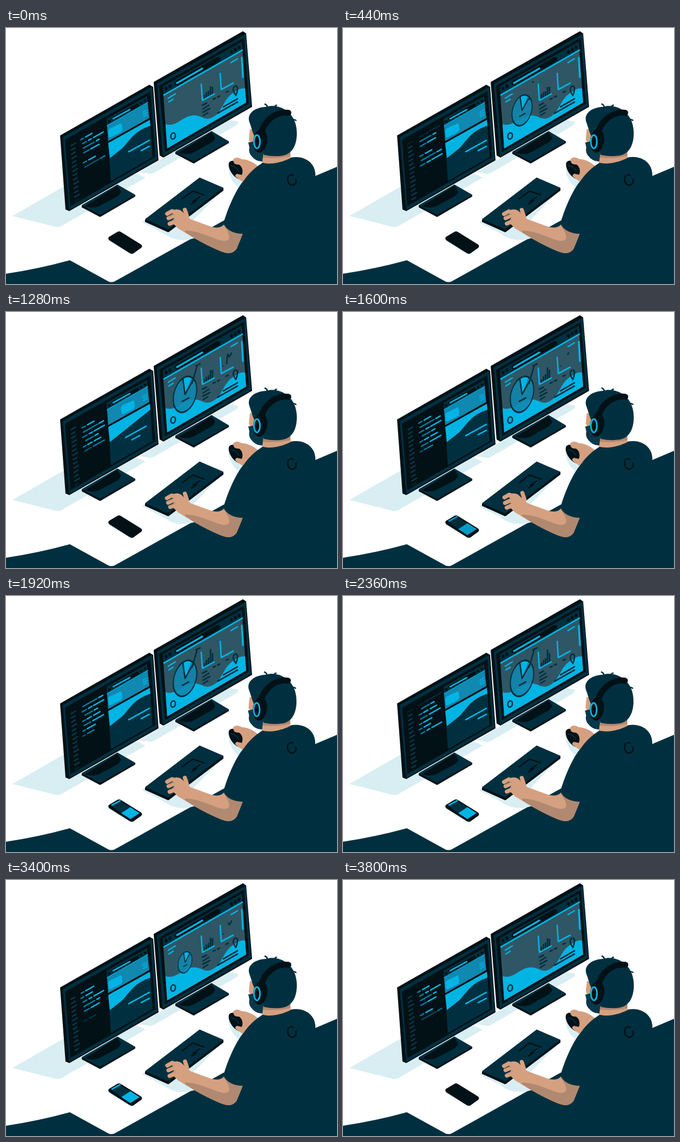
Recreate the animation shown at these times as an HTML page. Size 612 px wide and 474 px high, loop 3.84 s.

```html
<!DOCTYPE html>
<html lang="en">
<head>
<meta charset="utf-8">
<title>Developer at work</title>
<style>
html, body { margin: 0; width: 100%; height: 100%; overflow: hidden; background: #fff; }
svg { display: block; width: 612px; height: 474px; }
.navy { fill: #003040; }
.black { fill: #021116; }
.cyan { fill: #00b4e4; }
.blue { fill: #1088b0; }
.shade { fill: #d8eef3; }
.skin { fill: #d5a080; }
.tan { fill: #b08970; }
.line { fill: none; stroke-width: 2.6; stroke-linecap: round; stroke-linejoin: round; }
.sn { stroke: #003040; }
.sb { stroke: #021116; }
.sc { stroke: #00b4e4; }
.ss { stroke: #d5a080; }
</style>
</head>
<body>
<svg viewBox="0 0 612 474">
  <!-- floor and shadows -->
  <path class="navy" d="M0 455Q60 446 118 430L187 468Q195 473 203 468L400 358L560 279L612 257V474H0Z"/>
  <path class="shade" d="M12 348L104 295L243 270L258 277L102 367Q97 370 91 368ZM247 267L266 270Q270 270 274 268L426 180Q432 175 427 173L410 170Z"/>
  <path class="shade" d="M252 360L257 355L400 300L335 368L352 388Q315 400 291 380ZM189 394L233 420L240 416L200 388ZM411 256Q412 285 436 299L446 282L420 250Z"/>

  <!-- left monitor -->
  <path class="black" d="M140 329L206 290L239 309V312L174 350L140 332Z"/>
  <path class="navy" d="M140 328L206 290L239 309L174 346Z"/>
  <path class="black" d="M146 330L206 292L213 303Q211 309 204 313L172 330Q160 335 146 330Z"/>
  <path class="black" d="M100 199L265 105L272 109L282 245L117 339L110 336Z"/>
  <path class="navy" d="M105 202L270 109L280 243L117 337Z"/>
  <path class="black" d="M109 207L267 117L276 239L119 330Z"/>
  <path class="navy" d="M186 168L261 126L270 239L194 283Z"/>
  <path class="line sb" style="stroke-width:6" d="M198 168L243 143"/>
  <path class="line sc" d="M198 168L229 151"/>
  <g class="black"><circle cx="191" cy="173" r="2.6"/><circle cx="250" cy="139" r="2.4"/><circle cx="257" cy="135" r="2.4"/></g>
  <path class="blue" d="M187 182L262 139L265 167L189 210Z"/>
  <path class="line sc" style="stroke-width:1.6" d="M187 181L262 138M253 156L260 152M253 160L261 156M254 164L261 160"/>
  <path id="patch" class="cyan" d="M192 186L211 177Q214 176 214 179L215 188Q215 191 212 193L194 202Q190 203 190 200L189 191Q189 188 192 186Z"/>
  <path class="black" d="M188 210L266 166V170L189 214Z"/>
  <path class="cyan" d="M189 213L266 170L267 181L192 241Z"/>
  <path id="hill" class="navy"/>
  <path id="text1" class="line sc" d="M227 229L265 208"/>
  <path id="text2" class="line sc" d="M250 227L265 219"/>
  <g id="margin" class="line" stroke="#083f50" style="stroke-width:2.2"></g>
  <g id="code" class="line sc"></g>

  <!-- right monitor -->
  <path class="black" d="M313 230L380 191L412 210V213L347 251L313 233Z"/>
  <path class="navy" d="M313 229L380 191L412 210L347 247Z"/>
  <path class="black" d="M319 231L380 193L387 203Q385 209 378 213L346 231Q333 236 319 231Z"/>
  <path class="black" d="M273 100L438 6L444 10L455 146L291 240L284 236Z"/>
  <path class="navy" d="M279 103L443 11L453 144L290 238Z"/>
  <path class="black" d="M283 107L440 18L449 140L294 230Z"/>
  <path class="navy" d="M290 108L436 25L438 41L291 125Z"/>
  <path fill="#2f5664" d="M291 125L437 41L444 138L298 223Z"/>
  <path class="line sb" style="stroke-width:9" d="M316 102L392 58"/>
  <path class="line sc" style="stroke-width:3.4" d="M316 102L363 75"/>
  <g class="black"><ellipse cx="296" cy="112" rx="2.6" ry="3.4"/><ellipse cx="303" cy="108" rx="2.6" ry="3.4"/>
    <ellipse cx="417" cy="44" rx="2.7" ry="3.6"/><ellipse cx="424" cy="40" rx="2.7" ry="3.6"/><ellipse cx="431" cy="36" rx="2.7" ry="3.6"/></g>
  <path class="cyan" d="M295 178C315 184 324 165 344 162C360 160 365 171 378 167C401 159 400 131 422 119C430 113 436 111 442 112L444 138L298 223Z"/>
  <path class="line sc" d="M292 124L437 41M300 130L313 122M301 137L309 132M416 64L428 57M361 104L363 134L385 122M396 84L398 114L420 102"/>
  <path class="line sc" style="stroke-width:3.4" d="M436 55L438 91"/>
  <path class="line sn" d="M363 143L371 139M364 150L375 143M364 156L377 149M365 162L373 157M383 132L387 130M391 128L395 126M407 119L411 117M391 158L428 137M402 146L428 131"/>
  <path class="line sn" d="M425 125C420 117 419 114 421 110C424 106 428 107 428 112Q428 118 425 125Z"/>
  <ellipse class="line sn" cx="309" cy="200" rx="4.2" ry="5.8" transform="rotate(12 309 200)"/>
  <g id="bars" class="line sn" style="stroke-width:2.8"></g>
  <path id="graph" class="line sn" d="M402 100L405 99L407 104L410 78L413 83L417 76" pathLength="1"/>
  <g id="pie">
    <g transform="matrix(.72 -.41 .07 1.03 0 0)">
      <circle class="blue" r="30" opacity=".88"/>
      <path class="cyan" d="M0 0L-3 -29.5A30 30 0 0 1 19 -23Z"/>
      <circle class="line sn" r="30" style="stroke-width:3"/>
    </g>
    <path class="line sn" d="M-4 -29L0 0L14 -25M-5 13L7 6.5"/>
  </g>
  <path id="callout" class="line sn" d="M344 132L353 101M351 100L359 96" pathLength="1"/>

  <!-- keyboard and phone -->
  <path class="black" d="M257 355L358 277L402 296V301L302 377Q300 379 297 377L257 359Z"/>
  <path class="navy" d="M257 354L358 277L402 296L300 373Z"/>
  <path class="line sb" d="M326 316L345 302L366 309M346 321L358 313M343 326L352 320"/>
  <path class="black" d="M190 387L205 378Q209 375 213 378L250 401Q253 404 250 407L236 417Q233 419 229 417L191 393Q188 390 190 387Z"/>
  <g id="phone">
    <path class="navy" d="M194 388L209 379L230 391L213 402Z"/>
    <path class="cyan" d="M213 402L230 391L247 402L230 413Z"/>
    <path class="line sc" d="M196 387L211 379"/>
  </g>

  <!-- mouse and right hand -->
  <g id="mouse">
    <path class="black" d="M412 250Q415 245 421 246C432 249 440 260 441 272Q440 281 431 280C419 276 410 260 412 250Z"/>
    <path class="line sn" style="stroke-width:2" d="M416 255Q426 256 430 265"/>
    <path class="skin" d="M421 248Q418 243 423 241Q429 238 436 243C448 243 460 250 469 259C461 264 454 271 447 283Q440 288 432 281L425 276Q422 272 427 270L436 272C439 265 437 257 431 253Q421 253 421 248Z"/>
  </g>

  <!-- left arm and hand -->
  <path class="skin" d="M318 342L329 350L341 354L374 366Q397 375 405 361L438 380C432 398 429 417 410 417C398 416 360 397 333 380L318 371L306 359Z"/>
  <path class="tan" d="M331 375C358 375 384 391 400 394Q412 395 413 388C412 379 407 372 402 364L438 380C432 398 429 417 410 417C398 416 360 397 331 378Z"/>
  <g id="fingers" class="line ss" style="stroke-width:7.5">
    <path d="M298 344L307 339L321 344"/><path d="M300 353L311 348L322 353"/>
    <path d="M303 362L313 358L324 363"/><path d="M331 336L335 348L330 360"/>
  </g>
  <path class="skin" d="M306 339Q318 331 328 342L341 354V374L318 371Z"/>
  <path class="line" stroke="#b08970" style="stroke-width:1.2" d="M301 349L311 345M304 358L313 354"/>

  <!-- torso and head -->
  <g id="body">
    <path class="navy" d="M402 362C409 337 424 300 440 282C452 265 463 257 475 249L526 240C551 235 574 249 572 276L590 474H400L438 381C421 381 407 374 402 362Z"/>
    <path class="line sb" d="M522 274C518 286 526 294 533 290Q538 287 536 280M525 273Q528 270 531 273"/>
    <path class="skin" d="M474 228L526 230V241C509 249 490 254 473 249Z"/>
    <path class="tan" d="M476 232L526 230V237Q500 243 475 240Z"/>
    <path class="skin" d="M451 187L449 207L455 216L472 213L467 190Z"/>
    <path class="navy" d="M450 174C445 160 458 147 481 146C502 139 533 153 537 185C540 207 534 232 513 236Q495 239 477 235L466 208C457 202 456 190 450 174Z"/>
    <path fill="#08384a" d="M448 212L458 210L477 224L474 247Q462 248 453 236Q448 230 450 221Z"/>
    <path class="line sn" d="M484 148Q483 143 479 141M496 149Q496 144 500 143M526 171Q531 168 536 171"/>
    <path class="line sb" style="stroke-width:11" d="M471 199C475 174 497 154 522 157"/>
    <ellipse class="black" cx="470" cy="209" rx="13" ry="22" transform="rotate(8 470 209)"/>
    <ellipse class="line sc" cx="464" cy="210.5" rx="5.6" ry="12.3" style="fill:#021116;stroke-width:3"/>
  </g>
</svg>
<script>
const LOOP = 3840, HALF = LOOP / 2, SLOPE = 0.565, PITCH = 8.8;
const el = id => document.getElementById(id);
const clamp = v => Math.max(0, Math.min(1, v));
const ease = (t, from, to) => { const p = clamp((t - from) / (to - from)); return p * p * (3 - 2 * p); };
// rises over [a, b], falls over [c, d]
const pulse = (t, a, b, c, d) => ease(t, a, b) - ease(t, c, d);
const mod = (a, n) => ((a % n) + n) % n;
const move = (id, x, y) => el(id).setAttribute('transform', `translate(${x} ${y})`);

// each row: start and end of its strokes along the line
const rows = [
  [[0, 5], [9, 21]], [[3, 10], [14, 19], [23, 41]], [[4, 24], [28, 33]], [[4, 14], [17, 32]],
  [], [[2, 8], [12, 24]], [[4, 30], [33, 41]], [[2, 10], [14, 20], [23, 42]], [[7, 21], [24, 30]],
  [[2, 7], [10, 18], [22, 34]], [[4, 16], [20, 40]], [[1, 6], [9, 24]]
];

function slanted(x, y, from, to) {
  return `M${x + from} ${y - from * SLOPE}L${x + to} ${y - to * SLOPE}`;
}

function drawCode(t) {
  const scroll = t / LOOP * rows.length * PITCH;
  el('code').innerHTML = rows.map((row, i) => {
    const y = mod(i * PITCH - scroll + PITCH, rows.length * PITCH) - PITCH;
    const shown = clamp((y + 4) / 4) * clamp((58 - y) / 8);
    if (!shown) return '';
    return row.map(([a, b], k) =>
      `<path opacity="${shown * (k ? 1 : 0.65)}" d="${slanted(138 + y * 0.07, 207 + y, a, b)}"/>`).join('');
  }).join('');

  let marks = '';
  for (let i = 0; i < 14; i++) {
    const y = i * 7.9 - mod(scroll / PITCH, 1) * 7.9;
    const shown = clamp((y + 5) / 5) * clamp((105 - y) / 5);
    marks += `<path opacity="${shown}" d="${slanted(120 + y * 0.075, 218 + y, 0, i % 3 ? 7 : 9)}"/>`;
  }
  el('margin').innerHTML = marks;
}

function drawPage(t) {
  const m = pulse(t, 480, 840, 1260, 1470);
  const mix = (a, b) => a + (b - a) * m;
  move('patch', 24 * m, -13.5 * m);
  move('text1', -6 * m, 3.4 * m);
  move('text2', -18 * m, 10 * m);
  el('hill').setAttribute('d',
    `M192 241C${mix(226, 217)} ${mix(223, 221)} ${mix(225, 242)} ${mix(194, 201)} 267 181L271 239L194 283Z`);
}

function drawStroke(id, from, to) {
  const path = el(id);
  path.style.visibility = to - from > 0.005 ? 'visible' : 'hidden';
  path.style.strokeDasharray = `0 ${from} ${Math.max(0, to - from)} 2`;
}

function drawCharts(t, half) {
  const size = pulse(t, 60, 560, 3200, 3660);
  el('pie').setAttribute('transform', `translate(331 152.5) scale(${size})`);
  el('pie').style.visibility = size > 0.01 ? 'visible' : 'hidden';
  drawStroke('callout', 0, pulse(t, 380, 1050, 2600, 3150));
  drawStroke('graph', ease(half, 1000, 1700), ease(half, 480, 1080));

  const swell = pulse(t, 1300, 1920, 2600, 3300);
  el('bars').innerHTML = [5, 8, 8, 14, 11].map((h, i) => {
    const x = 367 + i * 3.7, y = 129.5 - i * 2.1;
    const grow = [-1, 0, 2, 10, 3][i] * swell;
    const wave = Math.sin(t / LOOP * 4 * Math.PI + i) - Math.sin(i);
    return `<path d="M${x} ${y}V${y - h - grow - wave}"/>`;
  }).join('');
}

function drawPerson(t) {
  const lean = pulse(t, 200, 800, 950, 1280) + pulse(t, 1450, 1900, 2700, 3300);
  el('body').setAttribute('transform', `rotate(${-0.2 * lean} 420 380)`);
  const reach = pulse(t, 300, 800, 920, 1250);
  move('mouse', 3.5 * reach, -1.5 * reach);
  [...el('fingers').children].forEach((finger, i) => {
    const tap = Math.sin(t / LOOP * 2 * Math.PI * 8 + i * 1.9);
    finger.setAttribute('transform', `translate(${0.6 * tap} ${-0.9 * tap})`);
  });
}

function frame(now) {
  const t = now % LOOP, half = t % HALF;
  drawCode(t);
  drawPage(half);
  drawCharts(t, half);
  drawPerson(t);
  el('phone').style.opacity = pulse(t, 1480, 1640, 3500, 3660);
  requestAnimationFrame(frame);
}
frame(performance.now());
</script>
</body>
</html>
```
